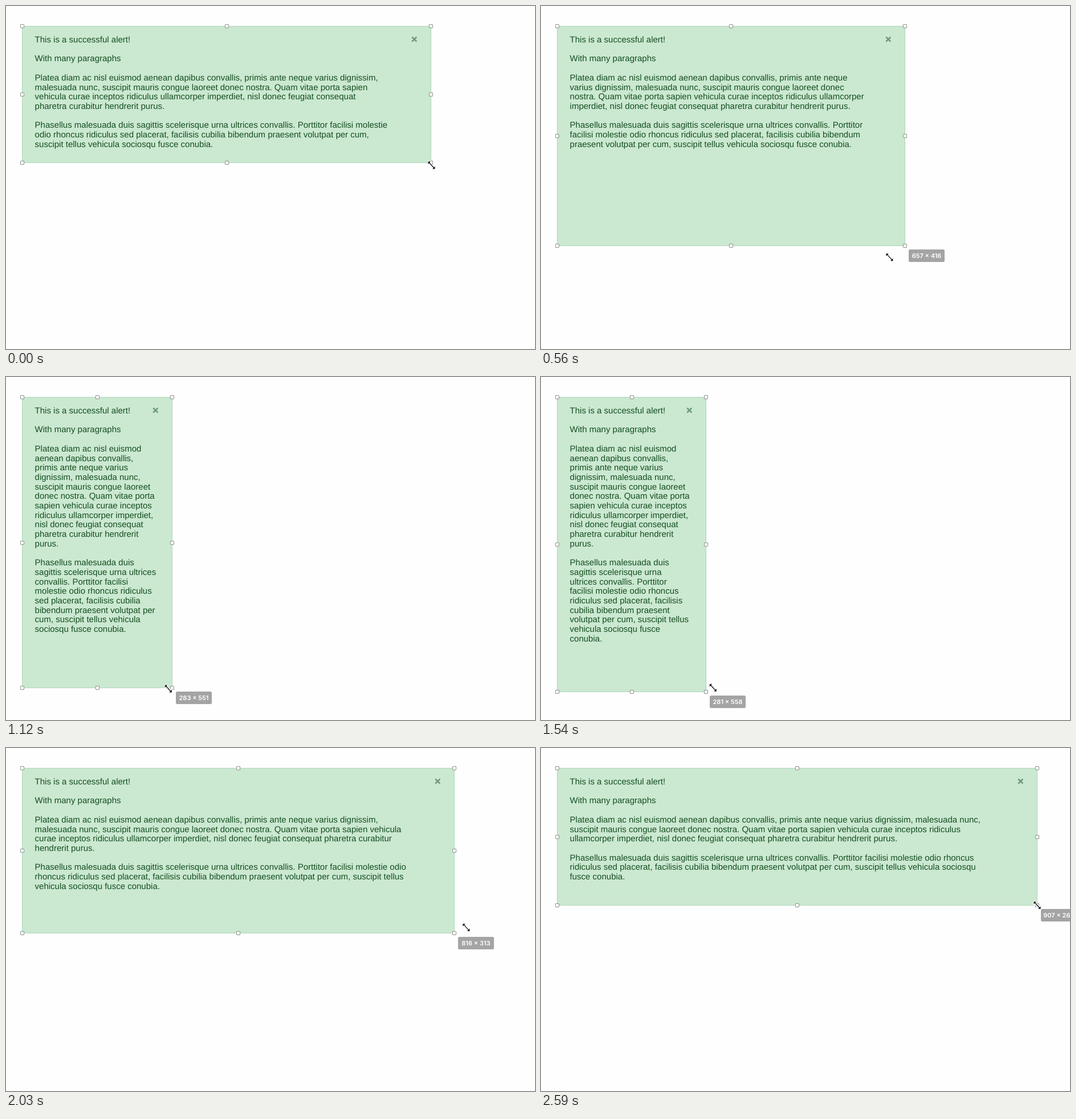
An HTML page for the animation above (2.66 s loop, 928 by 603 pixels).

```html
<!DOCTYPE html>
<html lang="en">
<head>
<meta charset="utf-8">
<title>Resizable alert</title>
<style>
  html, body { margin: 0; width: 100%; height: 100%; overflow: hidden; background: #fefefe; }
  svg { display: block; width: 928px; height: 603px; }
  .copy { font: 15px "Liberation Sans", Arial, sans-serif; fill: #154f21; text-rendering: geometricPrecision; }
  .size { font: 600 11px Inter, "Open Sans", sans-serif; fill: #fff; text-anchor: middle; }
  .handle { fill: #fff; stroke: #8b928d; }
</style>
</head>
<body>
<svg id="stage" viewBox="0 0 928 603">
  <rect id="box" x="28.5" y="35.5" fill="#cbe8d1" stroke="#b0d8ba"/>
  <g id="copy" class="copy"></g>
  <path id="close" d="M-4 -4L4 4M4 -4L-4 4" stroke="#6f9a7c" stroke-width="2.5"/>
  <g id="handles"></g>
  <g id="badge">
    <rect width="63" height="22" rx="2.5" fill="#a4a4a4"/>
    <text id="size" class="size" x="31.5" y="15"></text>
  </g>
  <g id="cursor" stroke-linejoin="round">
    <path d="M-6 -6.5H-1.2L-2.8 -4.4L3.2 2.6L5 1V6.5H.6L2.2 4.4L-4.2 -2.6L-6 -1Z" fill="#fff" stroke="#fff" stroke-width="2"/>
    <path d="M-6 -6.5H-1.6L-6 -1.8ZM6 6.5H1.6L6 1.8Z" fill="#111"/>
    <path d="M-4.5 -5L4.5 5" stroke="#111" stroke-width="1.3"/>
  </g>
</svg>
<script>
const LOOP = 2660, STEP = 70, LEFT = 28.5, TOP = 35.5, ZOOM = 0.928;
const LINE = 16.7, TEXT_X = 50.6, FIRST_BASELINE = 64, WRAP_SIZE = 14.84;

// Turning points of the dragged corner; trail is how far the fill lags behind it.
const drag = [
  { t: 420, x: 745, y: 275 },
  { t: 560, x: 638, y: 421 },
  { t: 840, x: 424, y: 534, trail: 4.5 },
  { t: 910, x: 403, y: 535 },
  { t: 1120, x: 291, y: 546 },
  { t: 1400, x: 285, y: 555 },
  { t: 1505, x: 285, y: 555 },
  { t: 1750, x: 436, y: 477 },
  { t: 2030, x: 786, y: 325 },
  { t: 2100, x: 814, y: 313 },
  { t: 2310, x: 868, y: 447 },
  { t: 2590, x: 870, y: 276 }
];

const paragraphs = [
  "This is a successful alert!",
  "With many paragraphs",
  "Platea diam ac nisl euismod aenean dapibus convallis, primis ante neque varius dignissim, malesuada nunc, suscipit mauris congue laoreet donec nostra. Quam vitae porta sapien vehicula curae inceptos ridiculus ullamcorper imperdiet, nisl donec feugiat consequat pharetra curabitur hendrerit purus.",
  "Phasellus malesuada duis sagittis scelerisque urna ultrices convallis. Porttitor facilisi molestie odio rhoncus ridiculus sed placerat, facilisis cubilia bibendum praesent volutpat per cum, suscipit tellus vehicula sociosqu fusce conubia."
];

const el = id => document.getElementById(id);
const pen = document.createElement("canvas").getContext("2d");
pen.font = `100px "Liberation Sans", Arial, sans-serif`;

// Slope through a point, flat where the motion turns or rests.
function slope(i, axis) {
  const a = drag[i - 1], b = drag[i], c = drag[i + 1];
  if (!a || !c) return 0;
  const before = (b[axis] || 0) - (a[axis] || 0), after = (c[axis] || 0) - (b[axis] || 0);
  return before * after <= 0 ? 0 : (before + after) / (c.t - a.t);
}

function glide(time, axis) {
  const last = drag.length - 1;
  const t = Math.min(Math.max(time, drag[0].t), drag[last].t);
  const i = Math.max(1, drag.findIndex(key => key.t >= t));
  const a = drag[i - 1], b = drag[i], span = b.t - a.t, s = (t - a.t) / span;
  const ease = s * s * (3 - 2 * s);
  return (a[axis] || 0) * (1 - ease) + (b[axis] || 0) * ease
    + span * s * (1 - s) * (slope(i - 1, axis) * (1 - s) - slope(i, axis) * s);
}

// Lines break by the advances of a grotesque with rounder bowls and narrower a and e.
function wrapWidth(text) {
  const count = set => (text.match(set) || []).length;
  const units = 2 * count(/[bcdpqt]/g) + count(/[gmo]/g) - count(/[ae]/g);
  return (pen.measureText(text).width / 100 + 0.0185 * units) * WRAP_SIZE;
}

function wrap(text, width) {
  const lines = [];
  let line = "";
  for (const word of text.split(" ")) {
    const longer = line ? line + " " + word : word;
    if (!line || wrapWidth(longer) <= width) line = longer;
    else {
      lines.push(line);
      line = word;
    }
  }
  return [...lines, line];
}

function copyMarkup(boxWidth) {
  let y = FIRST_BASELINE, markup = "";
  for (const text of paragraphs) {
    for (const line of wrap(text, 0.895 * boxWidth - 21.5)) {
      markup += `<text x="${TEXT_X}" y="${y.toFixed(1)}">${line}</text>`;
      y += LINE;
    }
    y += LINE;
  }
  return markup;
}

function handleMarkup(x, y) {
  const xs = [LEFT, (LEFT + x) / 2, x], ys = [TOP, (TOP + y) / 2, y];
  let markup = "";
  xs.forEach((cx, i) => ys.forEach((cy, j) => {
    if (i === 1 && j === 1) return;
    const px = Math.floor(cx) - 2.5, py = Math.floor(cy) - 2.5;
    markup += `<rect class="handle" x="${px}" y="${py}" width="6" height="6" rx=".5"/>`;
  }));
  return markup;
}

const moveTo = (id, x, y) => el(id).setAttribute("transform", `translate(${x} ${y})`);

function draw(time) {
  const cornerX = glide(time, "x"), cornerY = glide(time, "y");
  const x = Math.round(cornerX) + 0.5, y = Math.round(cornerY) + 0.5;
  const width = x - LEFT + glide(time, "trail");
  el("box").setAttribute("width", width);
  el("box").setAttribute("height", y - TOP);
  el("copy").innerHTML = copyMarkup(width);
  el("handles").innerHTML = handleMarkup(x, y);
  moveTo("close", LEFT + width - 29.2, 58.5);

  const dragging = time >= drag[0].t;
  el("badge").style.display = dragging ? "" : "none";
  moveTo("badge", x + 6.5, y + 6.5);
  const shownWidth = Math.round((cornerX - LEFT) / ZOOM);
  const shownHeight = Math.round((cornerY - TOP) / ZOOM + 0.8);
  el("size").textContent = `${shownWidth} × ${shownHeight}`;

  // The pointer runs ahead of the box it drags.
  const ahead = time + STEP / 2;
  if (dragging) moveTo("cursor", glide(ahead, "x") + 0.5, glide(ahead, "y") + 0.5);
  else moveTo("cursor", 746.5, 280);
}

let shown = -1;
const start = performance.now();
function tick() {
  const time = Math.floor(((performance.now() - start) % LOOP) / STEP) * STEP;
  if (time !== shown) draw(shown = time);
  requestAnimationFrame(tick);
}
tick();
</script>
</body>
</html>
```
